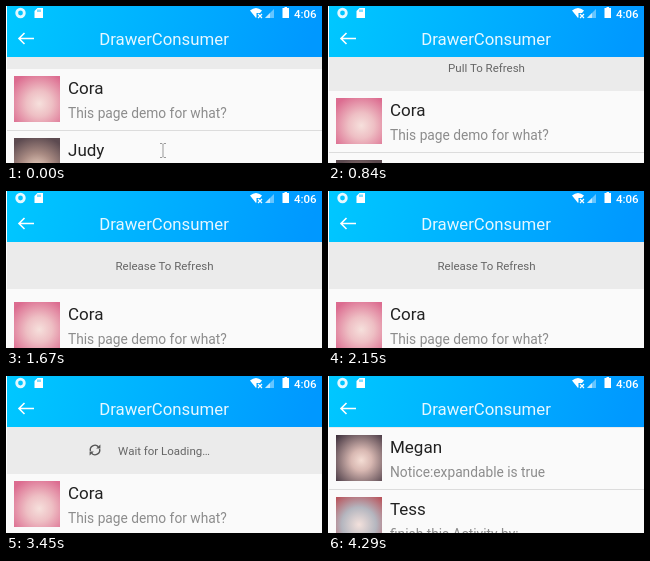
Recreate the animation shown at these times as an HTML page. Size 316x157 px, loop 4.72 s.

```html
<!DOCTYPE html>
<html lang="en">
<head>
<meta charset="utf-8">
<title>Pull to refresh</title>
<style>
@property --top { syntax: "<length>"; inherits: true; initial-value: 63px; }

html, body { margin: 0; width: 100%; height: 100%; overflow: hidden; background: #fafafa; }
svg { display: block; width: 316px; height: 157px; font-family: Roboto, sans-serif; }

svg, .cursor, .pull, .release, .wait, .before, .after, .spin {
  animation: 4720ms step-end infinite;
}

/* --top is the upper edge of the list; the refresh header stops at 98px */
svg { animation-name: drag; }
.rows { transform: translateY(var(--top)); }
.head { transform: translateY(min(var(--top), 98px)); }
.cursor { transform: translateY(calc((var(--top) - 63px) * 2)); animation-name: cursor; }

@keyframes drag {
  0%     { --top: 63px; animation-timing-function: steps(4); }
  10.16% { --top: 76px; animation-timing-function: steps(6); }
  25.2%  { --top: 94px; animation-timing-function: steps(4); }
  35.37% { --top: 104px; }
  58.26% { --top: 104px; animation-timing-function: steps(4); }
  68.21% { --top: 98px; }
  80.71% { --top: 94px; }
  83.25% { --top: 79px; }
  85.79% { --top: 65px; }
  88.34% { --top: 56px; }
  90.88%, 100% { --top: 52px; }
}
@keyframes cursor { 0% { visibility: visible; } 7.62%, 100% { visibility: hidden; } }

.pull { animation-name: pull; }
.release { animation-name: release; }
.wait { animation-name: wait; }
@keyframes pull { 0% { visibility: visible; } 30.29%, 100% { visibility: hidden; } }
@keyframes release {
  0% { visibility: hidden; }
  30.29% { visibility: visible; }
  60.8%, 100% { visibility: hidden; }
}
@keyframes wait { 0% { visibility: hidden; } 60.8%, 100% { visibility: visible; } }

.before { animation-name: before; }
.after { animation-name: after; }
@keyframes before { 0% { visibility: visible; } 80.71%, 100% { visibility: hidden; } }
@keyframes after { 0% { visibility: hidden; } 80.71%, 100% { visibility: visible; } }

.spin { animation-name: spin; }
@keyframes spin {
  0%, 60.8% { transform: rotate(0deg); animation-timing-function: steps(5); }
  73.09%, 100% { transform: rotate(180deg); }
}

.name { font-size: 17px; fill: #212121; }
.note { font-size: 13.75px; fill: #8c8c8c; }
.head text { font-size: 11.5px; fill: #666; text-anchor: middle; }
.title { font-size: 16.8px; fill: #e6f7ff; text-anchor: middle; }
.clock { font-size: 11.5px; font-weight: 500; fill: #fff; }
.line { fill: #dcdcdc; }
</style>
</head>
<body>
<svg viewBox="0 0 316 157">
  <defs>
    <linearGradient id="sky" x2="1" y2=".05">
      <stop stop-color="#00c8ff"/><stop offset="1" stop-color="#0098ff"/>
    </linearGradient>
    <radialGradient id="pink" cx=".55" cy=".6" r=".7">
      <stop stop-color="#f6e0dc"/><stop offset=".4" stop-color="#eebfc4"/><stop offset="1" stop-color="#dc6c90"/>
    </radialGradient>
    <radialGradient id="brown" cx=".5" cy=".7" r=".75">
      <stop stop-color="#f3d9c8"/><stop offset=".5" stop-color="#a88a82"/><stop offset="1" stop-color="#5c4a50"/>
    </radialGradient>
    <radialGradient id="plum" cx=".55" cy=".55" r=".75">
      <stop stop-color="#f4ddd4"/><stop offset=".3" stop-color="#d8b8b2"/><stop offset="1" stop-color="#40323e"/>
    </radialGradient>
    <radialGradient id="silver" cx=".5" cy=".6" r=".75">
      <stop stop-color="#f3e1dc"/><stop offset=".5" stop-color="#b4b6bf"/><stop offset="1" stop-color="#b9545c"/>
    </radialGradient>
  </defs>

  <rect width="316" height="157" fill="#ebebeb"/>

  <g class="head">
    <rect width="316" height="157" fill="#fafafa"/>
    <text class="pull" x="158.5" y="-19">Pull To Refresh</text>
    <text class="release" x="158.5" y="-19">Release To Refresh</text>
    <g class="wait">
      <text x="158" y="-19.5">Wait for Loading…</text>
      <g transform="translate(89 -24)">
        <g class="spin" fill="none" stroke="#555" stroke-width="1.4">
          <path d="M-4.6 1A4.7 4.7 0 0 1 3.4 -3.3M4.6 -1A4.7 4.7 0 0 1 -3.4 3.3"/>
          <path d="M5.4 -5.6V-1.4H1.2ZM-5.4 5.6V1.4H-1.2Z" fill="#555" stroke="none"/>
        </g>
      </g>
    </g>
  </g>

  <g class="rows">
    <g class="before">
      <rect x="8" y="7" width="46" height="46" fill="url(#pink)"/>
      <text class="name" x="62" y="25">Cora</text>
      <text class="note" x="62" y="49">This page demo for what?</text>
      <rect class="line" y="61" width="316" height="1"/>
      <rect x="8" y="69" width="46" height="46" fill="url(#brown)"/>
      <text class="name" x="62" y="87">Judy</text>
    </g>
    <g class="after">
      <rect x="8" y="7" width="46" height="46" fill="url(#plum)"/>
      <text class="name" x="62" y="25">Megan</text>
      <text class="note" x="62" y="49">Notice:expandable is true</text>
      <rect class="line" y="61" width="316" height="1"/>
      <rect x="8" y="69" width="46" height="46" fill="url(#silver)"/>
      <text class="name" x="62" y="87">Tess</text>
      <text class="note" x="62" y="111">finish this Activity by:</text>
    </g>
  </g>

  <path class="cursor" d="M154 137.5H156L157 138.5L158 137.5H160M157 138.5V150.5M154 151.5H156L157 150.5L158 151.5H160" fill="none" stroke="#999"/>

  <rect width="316" height="51" fill="url(#sky)"/>
  <path d="M28 32.5H13.5M18.5 27L13 32.5L18.5 38" fill="none" stroke="#fff" stroke-width="1.6"/>
  <text class="title" x="158" y="39">DrawerConsumer</text>

  <circle cx="14.5" cy="7" r="3.8" fill="none" stroke="#e4f8ff" stroke-width="2.8"/>
  <path d="M31.5 2H37V12H28.5V5Z" fill="#fff"/>
  <path d="M32 3.5V6M34 3.5V6" stroke="#00bfff"/>
  <path d="M244 4.5Q250 -.5 256 4.5L254 7H250.5V11.2L250 12Z" fill="#fff"/>
  <path d="M252 8L256 12M256 8L252 12" stroke="#fff" stroke-width="1.2"/>
  <path d="M268 3V12H259Z" fill="#fff" opacity=".4"/>
  <path d="M264 7V12H259Z" fill="#fff" opacity=".6"/>
  <path d="M278.5 2H276.5V12H283V2H281V1H278.5Z" fill="#fff"/>
  <text class="clock" x="288" y="11.5">4:06</text>

  <rect width="1" height="157" fill="#fff"/>
</svg>
</body>
</html>
```
